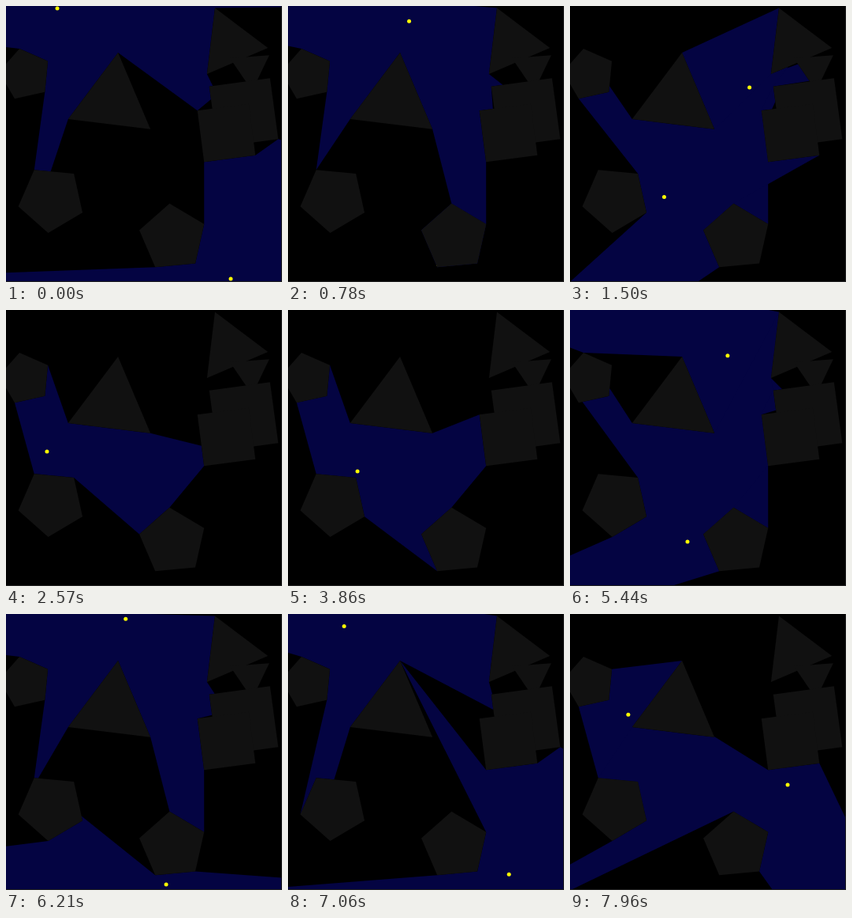
These frames come from a looping animation (350x349 px, 8 s). An HTML page with a canvas:

```html
<!DOCTYPE html>
<html lang="en">
<head>
<meta charset="utf-8">
<title>Two lights</title>
<style>
  html, body { margin: 0; width: 100%; height: 100%; overflow: hidden; background: #000; }
  canvas { display: block; width: 350px; height: 349px; }
</style>
</head>
<body>
<canvas width="350" height="349"></canvas>
<script>
const W = 350, H = 349, LOOP = 8000, REACH = 800, LAG = 40;
const CENTER = [175, 174];
const ctx = document.querySelector('canvas').getContext('2d');

// Regular polygon: side count, centre, radius, angle of one corner in degrees.
function polygon(sides, cx, cy, r, degrees) {
  return Array.from({ length: sides }, (_, i) => {
    const a = degrees * Math.PI / 180 + i * 2 * Math.PI / sides;
    return [cx + r * Math.cos(a), cy + r * Math.sin(a)];
  });
}

const shapes = [
  polygon(5, 24.3, 86.6, 33.4, -30.5),
  polygon(5, 57.6, 244.2, 43, 23.5),
  polygon(5, 211.4, 293, 43.4, -95.3),
  polygon(3, 134.7, 119.3, 60.7, -83),
  polygon(3, 284, 47.2, 48.5, 6.9),
  polygon(3, 310, 78.5, 28.9, -34.5),
  polygon(4, 301.5, 135, 55, -52.7),
  polygon(4, 279.5, 160.5, 46.4, 37.6)
];
const edges = shapes.flatMap(s => s.map((p, i) => [p, s[(i + 1) % s.length]]));
const targets = [...shapes.flat(), [0, 0], [W, 0], [W, H], [0, H]];

// Key points of the pointer: time, then offset from the centre.
const path = [
  [170, -110, -171], [900, 0, -145], [1500, 55.5, -67.5], [2570, 123, -5],
  [3130, 131, 32], [3860, 87, -30], [4860, 15, -88], [5440, 26, -119],
  [5740, 38, -155], [6210, -28, -168], [7000, -103, -160], [7960, -101, -42]
];

function slope(i, axis) {
  const a = path[Math.max(i - 1, 0)], b = path[Math.min(i + 1, path.length - 1)];
  return (b[axis] - a[axis]) / (b[0] - a[0]);
}

// Cubic Hermite curve through the key points, at rest outside them.
function offsetAt(t) {
  let i = 0;
  while (i < path.length - 2 && t >= path[i + 1][0]) i++;
  const p = path[i], q = path[i + 1], span = q[0] - p[0];
  const u = Math.min(Math.max((t - p[0]) / span, 0), 1);
  const ease = u * u * (3 - 2 * u);
  return [1, 2].map(axis =>
    p[axis] + (q[axis] - p[axis]) * ease +
    span * (slope(i, axis) * u * (1 - u) ** 2 - slope(i + 1, axis) * u * u * (1 - u)));
}

// Where a ray from the light towards a target first meets an edge.
function castRay([x, y], [tx, ty]) {
  const angle = Math.atan2(ty - y, tx - x), dx = Math.cos(angle), dy = Math.sin(angle);
  let nearest = REACH;
  for (const [[ax, ay], [bx, by]] of edges) {
    const ex = bx - ax, ey = by - ay, cross = dx * ey - dy * ex;
    if (Math.abs(cross) < 1e-9) continue;
    const along = ((ax - x) * ey - (ay - y) * ex) / cross;
    const part = ((ax - x) * dy - (ay - y) * dx) / cross;
    if (along > 0 && along < nearest && part > -1e-6 && part < 1 + 1e-6) nearest = along;
  }
  return { angle, point: [x + dx * nearest, y + dy * nearest] };
}

function fillPolygon(points, color) {
  ctx.fillStyle = color;
  ctx.beginPath();
  points.forEach(p => ctx.lineTo(...p));
  ctx.fill();
}

// One light trails the pointer slightly, the other is its mirror image.
function lightAt(t, side) {
  return offsetAt(t).map((d, axis) => CENTER[axis] + side * d);
}

function draw(t) {
  const lights = [lightAt(t - LAG, 1), lightAt(t, -1)];
  ctx.fillStyle = '#000';
  ctx.fillRect(0, 0, W, H);
  for (const light of lights) {
    const hits = targets.map(p => castRay(light, p)).sort((a, b) => a.angle - b.angle);
    fillPolygon(hits.map(h => h.point), '#040442');
  }
  ctx.fillStyle = '#ff0';
  for (const [x, y] of lights) {
    ctx.beginPath();
    ctx.arc(x, y, 2.5, 0, 2 * Math.PI);
    ctx.fill();
  }
  shapes.forEach(s => fillPolygon(s, '#111'));
  ctx.fillStyle = '#222';
  ctx.fillRect(W - 1, 0, 1, H);
  ctx.fillRect(0, H - 1, W, 1);
}

const start = performance.now();
function tick() {
  draw((performance.now() - start) % LOOP);
  requestAnimationFrame(tick);
}
tick();
</script>
</body>
</html>
```
